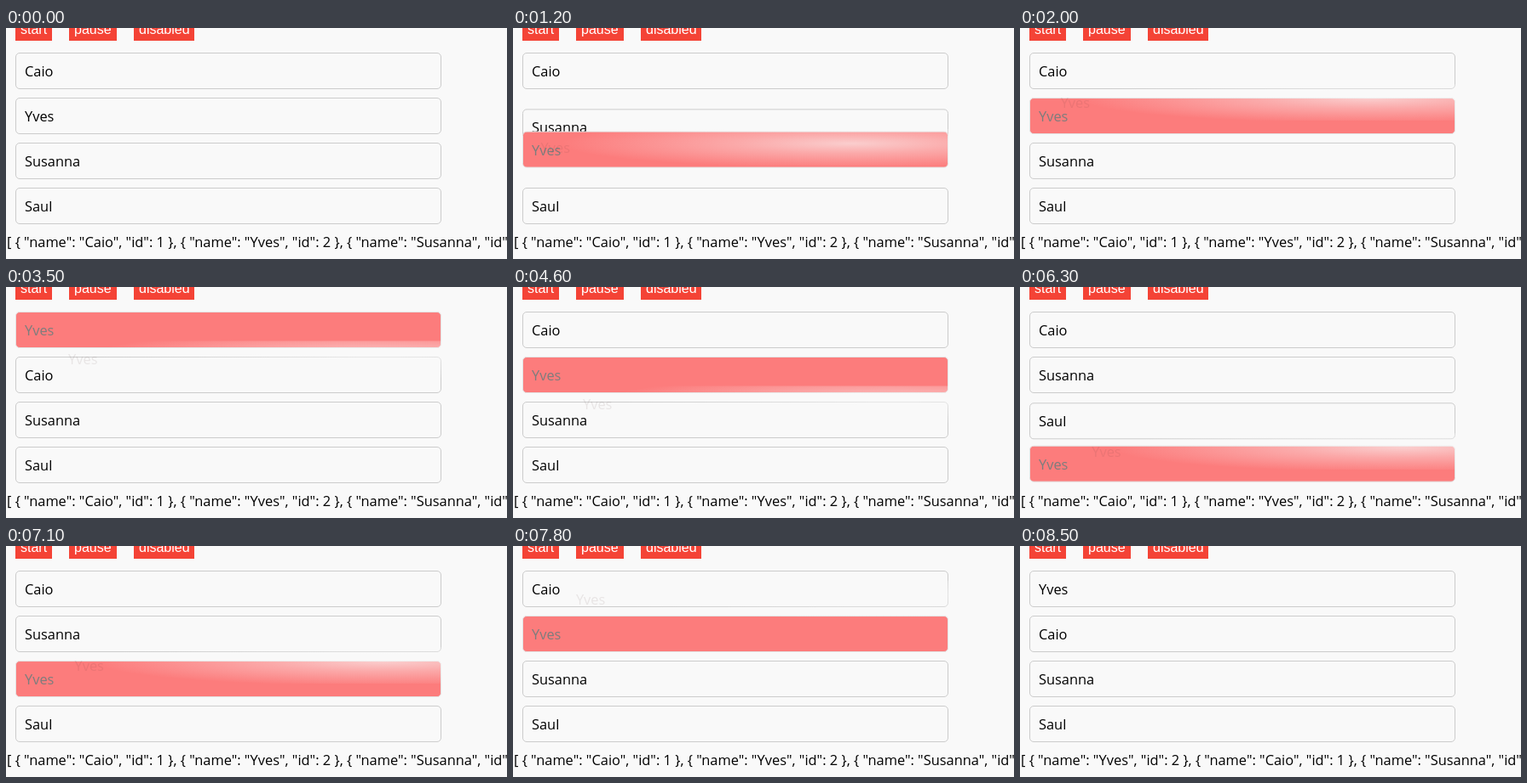
An HTML page with a canvas that plays this animation: 588 by 272 pixels, repeating every 9.6 s.

```html
<!DOCTYPE html>
<html lang="en">
<head>
<meta charset="utf-8">
<title>Drag to reorder</title>
<style>
  html, body { margin: 0; width: 100%; height: 100%; overflow: hidden; background: #f9f9f9; }
  canvas { display: block; }
</style>
</head>
<body>
<canvas id="stage" width="588" height="272"></canvas>
<script>
const ctx = document.getElementById('stage').getContext('2d');
const LOOP = 9600, TICK = 100;
const PICK = 900, DROP = 8500;
const SLIDE = 200;  // a row slides to its new slot
const LEAD = 210;   // the drag image moves ahead of the swap
const BG = '#f9f9f9', RED = '#fc7c7c';
const BODY_FONT = '16.4px "Open Sans", "Noto Sans", sans-serif';
const BUTTON_FONT = '16px "Liberation Sans", Arial, sans-serif';
const ROW = { x: 11, y: 29, w: 500, h: 43, step: 53 };

const people = ['Caio', 'Yves', 'Susanna', 'Saul'].map((name, i) => ({ name, id: i + 1 }));
const dragged = people[1];
const others = people.filter(p => p !== dragged);

// Swap times and the slot the dragged row takes at each.
const swaps = [1110, 1810, 2610, 3510, 4610, 6140, 6910, 7410, 7910];
const slots = [2, 1, 0, 1, 2, 3, 2, 1, 0];

const mix = (a, b, p) => a + (b - a) * p;
const clamp = p => Math.max(0, Math.min(1, p));
const easeOut = p => 1 - Math.pow(1 - p, 2.3);
const slotY = slot => ROW.y + slot * ROW.step;

// The latest move begun by time t, counting its start as `early` before the swap.
function moveAt(t, early) {
  const i = swaps.filter(s => s - early <= t).length - 1;
  return {
    from: i > 0 ? slots[i - 1] : 1,
    to: i >= 0 ? slots[i] : 1,
    began: i > 0 ? swaps[i - 1] : PICK,
    at: i >= 0 ? swaps[i] : PICK
  };
}

// Sideways drift of the pointer: out to the right, then back.
const drift = t => 74 - 2.6 * Math.pow((t - 5600) / 1000, 2);

function box(x, y, w, h) {
  ctx.beginPath();
  ctx.roundRect(x, y, w, h, 4.5);
}

function text(str, x, y, font, color) {
  ctx.font = font;
  ctx.fillStyle = color;
  ctx.fillText(str, x, y);
}

function button(label, x, w) {
  ctx.fillStyle = '#f44336';
  ctx.fillRect(x, 0, w, 15);
  text(label, x + 6, 7, BUTTON_FONT, '#fff');
}

function row(name, slot, picked) {
  const y = slotY(slot);
  box(ROW.x + 0.5, y + 0.5, ROW.w - 1, ROW.h - 1);
  if (picked) {
    ctx.fillStyle = RED;
    ctx.fill();
  }
  ctx.strokeStyle = picked ? '#e3e3e3' : '#ccc';
  ctx.stroke();
  text(name, 22, y + 28, BODY_FONT, picked ? '#7d7d7d' : '#000');
}

// Drag image: strongest near the pointer, fading out as an ellipse.
function dragImage(t) {
  const { from, to, began, at } = moveAt(t, LEAD);
  const p = clamp((t - at + LEAD) / LEAD);
  const x = mix(drift(began), drift(at), p);
  const y = mix(slotY(from), slotY(to), p) - 16;
  ctx.save();
  box(x, y, ROW.w, ROW.h);
  ctx.clip();
  text(dragged.name, x + 11, y + 28, BODY_FONT, 'rgba(90,60,60,0.1)');
  ctx.translate(x + 375, y + 17);
  ctx.scale(1, 0.085);
  const glow = ctx.createRadialGradient(0, 0, 0, 0, 0, 340);
  glow.addColorStop(0, 'rgba(249,249,249,0.65)');
  glow.addColorStop(0.4, 'rgba(249,249,249,0.36)');
  glow.addColorStop(1, 'rgba(249,249,249,0)');
  ctx.fillStyle = glow;
  ctx.fillRect(-400, -600, 800, 1200);
  ctx.restore();
}

function rows(t) {
  const { from, to, at } = moveAt(t, 0);
  const p = easeOut(clamp((t - at) / SLIDE));
  others.forEach((person, k) => {
    const slotFor = gap => k + (gap <= k ? 1 : 0);
    row(person.name, mix(slotFor(from), slotFor(to), p), false);
  });
  row(dragged.name, mix(from, to, p), t >= PICK && t < DROP);
}

function listing(t) {
  const list = t < DROP ? people : [dragged, ...others];
  const items = list.map(p => `{ "name": "${p.name}", "id": ${p.id} }`);
  text(`[ ${items.join(', ')} ]`, 1, 258, BODY_FONT, '#000');
}

function draw(t) {
  ctx.fillStyle = BG;
  ctx.fillRect(0, 0, 588, 272);
  button('start', 11, 43);
  button('pause', 74, 56);
  button('disabled', 150, 71);
  rows(t);
  if (t >= PICK && t < DROP) dragImage(t);
  listing(t);
}

const began = performance.now();
function frame() {
  const t = (performance.now() - began) % LOOP;
  draw(Math.floor(t / TICK) * TICK);
  requestAnimationFrame(frame);
}
frame();
</script>
</body>
</html>
```
